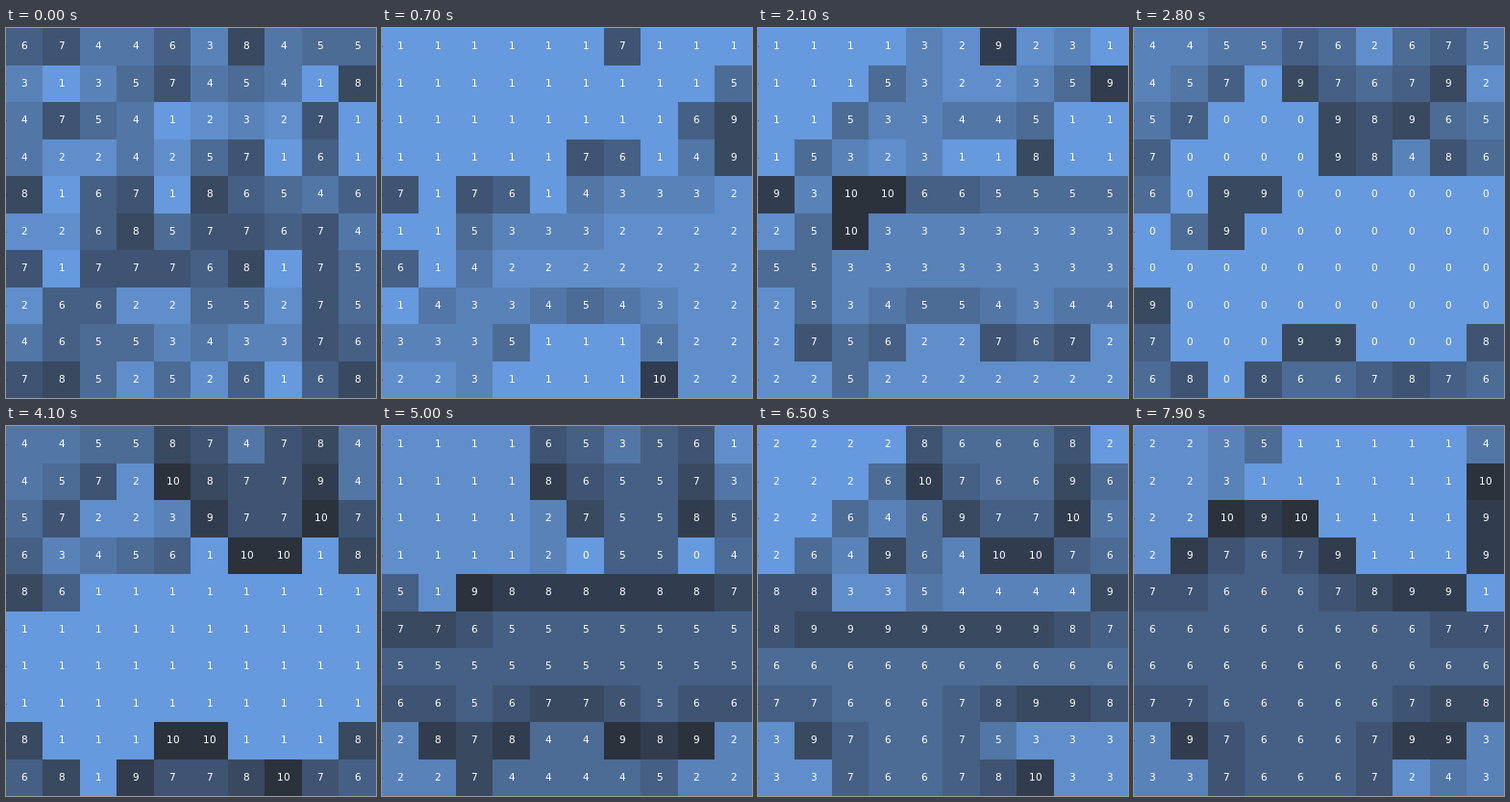
Write an HTML page that moves like this. It is 385 px wide and 385 px high and loops after 8 s.

```html
<!DOCTYPE html>
<html lang="en">
<head>
<meta charset="utf-8">
<title>Energy grid</title>
<style>
  html, body { margin: 0; width: 100%; height: 100%; overflow: hidden; background: #69d; }
  svg { display: block; width: 385px; height: 385px; }
  text { font: 10.5px "DejaVu Sans", sans-serif; letter-spacing: 0.32px; fill: #fff; }
</style>
</head>
<body>
<svg id="grid" viewBox="0 0 385 385"></svg>
<script>
const START = `6744638455
3135745418
4754123271
4224257161
8167186546
2268577674
7177768175
2662255275
4655343376
7852526168`;
const N = 10, CELL = 38.5, FRAME = 100, COUNT = 80;
const ADVANCE = 7;
const LIGHT = [102, 153, 221], DARK = [36, 38, 42];

const shade = k =>
  `rgb(${LIGHT.map((c, i) => Math.round(c + (DARK[i] - c) * k / 10))})`;
const middle = i => (i + 0.5) * CELL;

// Every cell above 9 flashes once, feeding its eight neighbours.
function flash(cells) {
  const next = cells.slice();
  const queue = [];
  next.forEach((v, i) => { if (v > 9) queue.push(i); });
  const flashed = new Set(queue);
  while (queue.length) {
    const i = queue.pop(), r = Math.floor(i / N), c = i % N;
    for (let y = Math.max(0, r - 1); y <= Math.min(N - 1, r + 1); y++) {
      for (let x = Math.max(0, c - 1); x <= Math.min(N - 1, c + 1); x++) {
        const j = y * N + x;
        if (++next[j] > 9 && !flashed.has(j)) {
          flashed.add(j);
          queue.push(j);
        }
      }
    }
  }
  flashed.forEach(i => { next[i] = 0; });
  return next;
}

// Charging and flashing take turns, one state each.
const states = [START.replace(/\s/g, "").split("").map(Number)];
while (states.length < COUNT) {
  const last = states[states.length - 1];
  states.push(states.length % 2 ? last.map(v => v + 1) : flash(last));
}

const svg = document.getElementById("grid");
function add(tag, attrs) {
  const el = document.createElementNS("http://www.w3.org/2000/svg", tag);
  for (const key in attrs) el.setAttribute(key, attrs[key]);
  return svg.appendChild(el);
}

const tiles = states[0].map((_, i) => {
  const r = Math.floor(i / N), c = i % N;
  const x = Math.floor(c * CELL), y = Math.ceil(r * CELL);
  return {
    center: middle(c),
    rect: add("rect", {
      x, y,
      width: Math.floor((c + 1) * CELL) - x,
      height: Math.ceil((r + 1) * CELL) - y,
      "shape-rendering": "crispEdges"
    }),
    label: add("text", { y: Math.floor(middle(r) + 3.4) })
  };
});
for (let r = 0; r < N; r++) {
  add("rect", { x: 0, y: Math.round(middle(r)), width: 1, height: 1, fill: "#000", "fill-opacity": 0.4 });
}

// Shades follow the rank of a value among those present; labels sit on whole pixels.
function draw(cells) {
  const ranks = [...new Set(cells)].sort((a, b) => a - b);
  tiles.forEach(({ center, rect, label }, i) => {
    const text = String(cells[i]);
    rect.setAttribute("fill", shade(ranks.indexOf(cells[i])));
    label.setAttribute("x", Math.round(center - (text.length * ADVANCE - 1) / 2));
    label.textContent = text;
  });
}

let shown = -1;
const begin = performance.now();
function tick() {
  const k = Math.floor(Math.max(0, performance.now() - begin) / FRAME) % COUNT;
  if (k !== shown) draw(states[shown = k]);
  requestAnimationFrame(tick);
}
tick();
</script>
</body>
</html>
```
